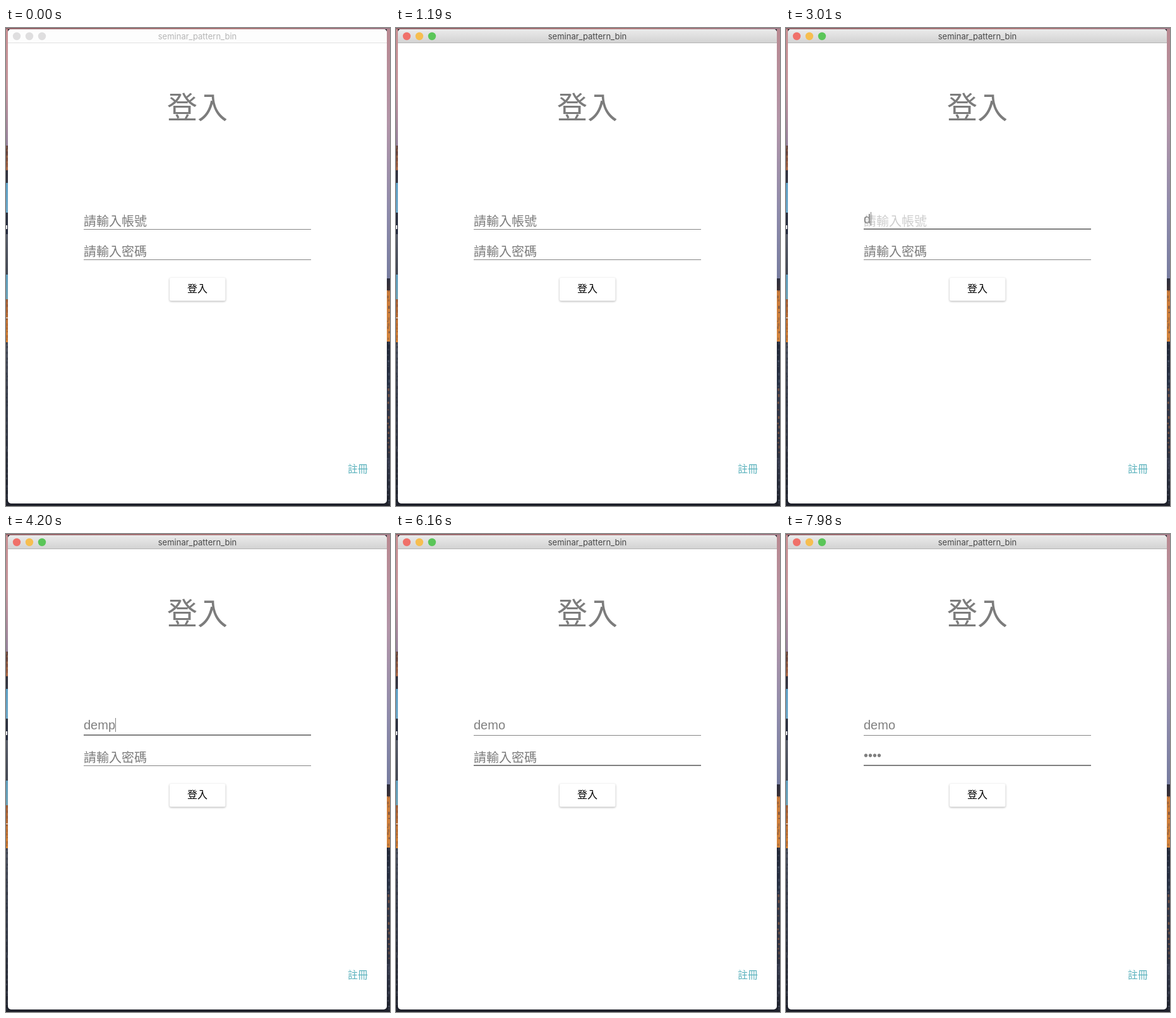
An HTML page for the animation above (8 s loop, 608 by 756 pixels).

```html
<!DOCTYPE html>
<html lang="zh-Hant">
<head>
<meta charset="utf-8">
<title>登入</title>
<style>
  html, body { margin: 0; width: 100%; height: 100%; overflow: hidden; background: #1b1e28; }
  svg { display: block; width: 608px; height: 756px; }
  text { white-space: pre; }
  .cjk { font-family: "Noto Sans CJK TC", "Noto Sans CJK", "Noto Sans", sans-serif; font-weight: 300; fill: #7c7c7c; }
  .hint { font-size: 20px; }
  .typed { font: 20px "Liberation Sans", Arial, sans-serif; fill: #808080; }
  .caption { font: 13px Inter, sans-serif; fill: #b5b5b5; text-anchor: middle; }
  .bar { fill: #fdfdfd; }
  .edge { fill: #e0e0e0; }
  .light { fill: #dfdedf; }
  .active .caption { fill: #484848; }
  .active .bar { fill: url(#chrome); }
  .active .edge { fill: #b4b4b4; }
  .active .light { fill: var(--on); }
  .button { fill: #fff; filter: drop-shadow(0 1px 1.5px rgba(0, 0, 0, .32)); }
  .focus { transform-box: fill-box; transform-origin: center; }
</style>
</head>
<body>
<svg id="stage" viewBox="0 0 608 756">
  <defs>
    <linearGradient id="chrome" x2="0" y2="1">
      <stop stop-color="#ebebeb"/><stop offset="1" stop-color="#d3d3d3"/>
    </linearGradient>
    <linearGradient id="sky" x2="1" y2="0">
      <stop stop-color="#96656a"/><stop offset=".6" stop-color="#b0797a"/><stop offset="1" stop-color="#a17c88"/>
    </linearGradient>
    <clipPath id="frame"><rect x="3" y="2" width="600" height="750" rx="5"/></clipPath>
  </defs>

  <g id="desktop"></g>

  <g clip-path="url(#frame)">
    <rect x="3" y="2" width="600" height="750" fill="#fff"/>
    <rect class="bar" x="3" y="2" width="600" height="21"/>
    <rect class="edge" x="3" y="23" width="600" height="1"/>
    <circle class="light" style="--on:#f0716a" cx="17" cy="13" r="6.2"/>
    <circle class="light" style="--on:#f6be50" cx="37" cy="13" r="6.2"/>
    <circle class="light" style="--on:#5bc659" cx="57" cy="13" r="6.2"/>
    <text class="caption" x="303" y="17.5">seminar_pattern_bin</text>
  </g>

  <text class="cjk" x="255" y="142.5" font-size="48">登入</text>
  <g id="fields"></g>
  <rect class="button" x="259" y="395" width="88.5" height="36.5" rx="2.5"/>
  <text class="cjk" x="287" y="418" font-size="16" style="fill:#000;font-weight:400">登入</text>
  <text class="cjk" x="541" y="703" font-size="16" style="fill:#57b0bb;font-weight:400">註冊</text>
</svg>

<script>
const LOOP = 8000, STEP = 70, FADE = 160, BLINK = 500, ACTIVATE = 1190;

function add(parent, tag, attrs, text = '') {
  const node = document.createElementNS('http://www.w3.org/2000/svg', tag);
  for (const key in attrs) node.setAttribute(key, attrs[key]);
  node.textContent = text;
  parent.append(node);
  return node;
}

// Soft bands of the wallpaper that shows around the window.
const desktop = document.getElementById('desktop');
let seed = 7;
const random = () => (seed = seed * 16807 % 2147483647) / 2147483647;

function bands(x, width, list) {
  list.forEach(([y, color, endColor, grain], i) => {
    const end = i + 1 < list.length ? list[i + 1][0] : 756;
    const id = `band${x}-${i}`;
    const ramp = add(desktop, 'linearGradient', { id, x2: 0, y2: 1 });
    add(ramp, 'stop', { 'stop-color': color });
    add(ramp, 'stop', { offset: 1, 'stop-color': endColor });
    add(desktop, 'rect', { x, y, width, height: end - y, fill: `url(#${id})` });
    for (let at = y; grain && at < end - 4; at += 4 + random() * 8) {
      add(desktop, 'rect', {
        x: x + random() * width / 2, y: at, width: width / 2, height: 2 + random() * 3,
        fill: grain, opacity: 0.3 + random() * 0.4
      });
    }
  });
}

bands(0, 3, [
  [0, '#c98f92', '#c5949a'], [90, '#c5949a', '#94819b'],
  [186, '#4a3438', '#a5603e', '#d08a50'], [225, '#2b2c38', '#30313d'],
  [245, '#5b9fc4', '#6aa5c6'], [292, '#282d3b', '#20263a'],
  [326, '#555a66', '#3d424e'], [390, '#5c9cbc', '#6aa0b4'],
  [429, '#a55e34', '#d9822f', '#733f2c'], [497, '#4d5260', '#343a48', '#20232e'],
  [600, '#343a48', '#191c26', '#4b5160']
]);
bands(603, 5, [
  [0, '#b98890', '#b295a8'], [150, '#b295a8', '#8e8bab'],
  [290, '#8e8bab', '#777c9f'], [396, '#2b2d3b', '#3b3036'],
  [415, '#c97a39', '#d4843c', '#5a4545'], [496, '#202636', '#293246', '#515c70'],
  [570, '#343a4b', '#2b303f', '#996040'], [680, '#33384a', '#1b1e28', '#515668']
]);
add(desktop, 'rect', { width: 608, height: 2, fill: 'url(#sky)' });
add(desktop, 'rect', { y: 752, width: 608, height: 4, fill: '#20222c' });
add(desktop, 'rect', { y: 312, width: 2, height: 6, fill: '#e8e8ea' });
add(desktop, 'rect', { y: 458, width: 3, height: 1, fill: '#f0f0f0' });

// Each edit is [time, content after the key press].
const fieldData = [
  { y: 318, hint: '請輸入帳號', focus: 1830, blur: 5400,
    edits: [[2910, 'd'], [3150, 'de'], [3430, 'dem'], [3850, 'demp'], [4480, 'dem'], [4830, 'demo']] },
  { y: 366, hint: '請輸入密碼', focus: 5400, blur: LOOP,
    edits: [[6510, '•'], [6790, '••'], [7070, '•••'], [7350, '••••']] }
];

const root = document.getElementById('fields');
const fields = fieldData.map(field => ({
  ...field,
  hintNode: add(root, 'text', { class: 'cjk hint', x: 123, y: field.y - 5.5 }, field.hint),
  base: add(root, 'rect', { x: 123, y: field.y, width: 360, height: 1, fill: '#868686' }),
  line: add(root, 'rect', { class: 'focus', x: 123, y: field.y - 1, width: 360, height: 2, fill: '#808080' }),
  typed: add(root, 'text', { class: 'typed', x: 123, y: field.y - 9 }),
  caret: add(root, 'rect', { y: field.y - 27, width: 1, height: 22, fill: '#808080' })
}));

const progress = (t, start) => Math.min(1, Math.max(0, (t - start) / FADE));

// Constant speed with a short ramp at both ends.
function easeBoth(p) {
  if (p < 0.2) return 3.125 * p * p;
  if (p > 0.8) return 1 - 3.125 * (1 - p) ** 2;
  return 1.25 * p - 0.125;
}

function drawField(field, t) {
  const focused = t >= field.focus && t < field.blur;
  const [edited, content] = field.edits.filter(([at]) => at <= t).pop() || [field.focus, ''];
  field.typed.textContent = content;
  field.hintNode.style.opacity = 1 - progress(t, field.edits[0][0]);
  field.line.style.transform = `scaleX(${focused ? easeBoth(progress(t, field.focus)) : 0})`;
  const width = content ? field.typed.getComputedTextLength() : 0;
  field.caret.setAttribute('x', 123 + Math.round(width));
  field.caret.style.opacity = focused && (t - edited) % (2 * BLINK) < BLINK ? 1 : 0;
}

const stage = document.getElementById('stage');
const start = performance.now();

function draw(now) {
  const elapsed = Math.max(0, now - start) % LOOP;
  const t = Math.floor(elapsed / STEP) * STEP;
  stage.classList.toggle('active', t >= ACTIVATE);
  fields.forEach(field => drawField(field, t));
  requestAnimationFrame(draw);
}
draw(start);
</script>
</body>
</html>
```
